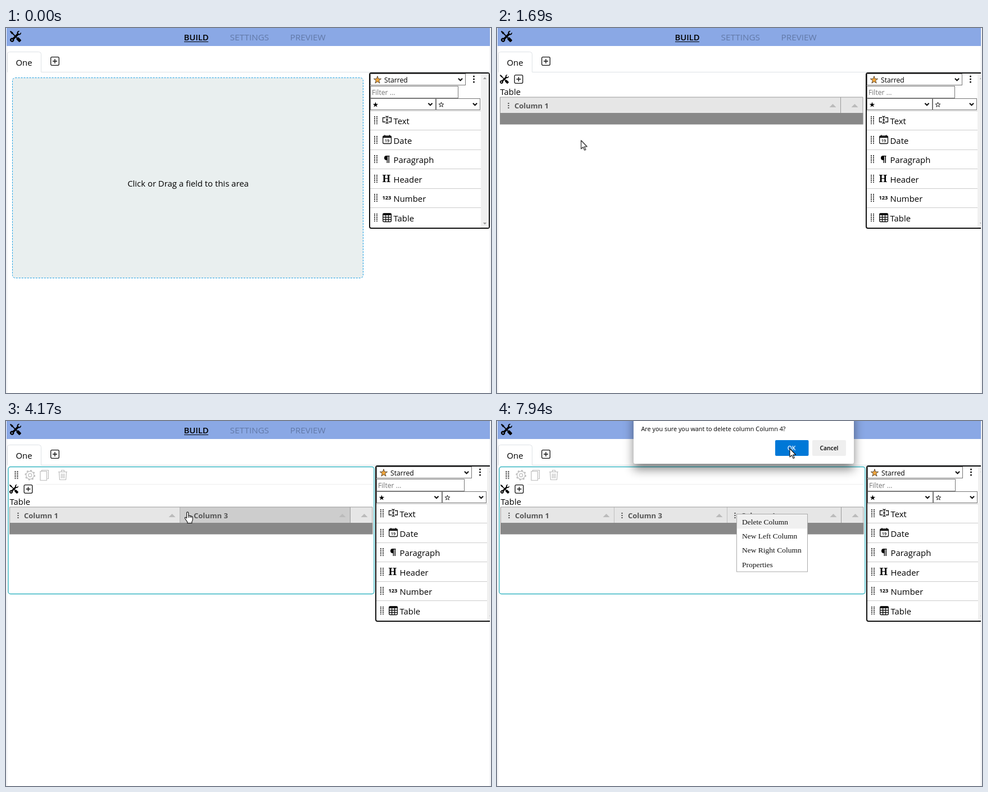
Recreate the animation shown at these times as an HTML page. Size 863x649 px, loop 8000 ms.

```html
<!DOCTYPE html>
<html lang="en">
<head>
<meta charset="utf-8">
<title>Form builder</title>
<style>
html, body { margin: 0; width: 100%; height: 100%; overflow: hidden; background: #fff; }
svg { display: block; width: 863px; height: 649px; }
text { font: 14.9px "Open Sans", "Noto Sans", sans-serif; fill: #000; }
.nav { font-size: 15.3px; fill: #6279a8; }
.nav.on { font-size: 14.8px; font-weight: 600; fill: #000; }
.small { font-size: 12.2px; }
.hint { fill: #757575; }
.col { font-size: 13px; font-weight: 700; fill: #555; }
.menu text { font: 13.5px "Liberation Serif", serif; fill: #111; }
.ask { font-size: 10.85px; }
.btn { font-size: 10.3px; font-weight: 600; text-anchor: middle; }
.ok { fill: #fff; }
.line { fill: none; stroke: #111; }
.box { fill: #fff; stroke: #767676; }
.dim { fill: none; stroke: #bdbdbd; stroke-width: 1.2; }

/* 1% = 80 ms */
.t { animation: 8s step-end infinite; }
.empty { animation-name: empty; }
.field { animation-name: field; }
.frame { animation-name: frame; }
.panel { animation-name: panel; }
.lift { animation-name: lift; }
.rowhot { animation-name: rowhot; }
.cols1 { animation-name: cols1; }
.cols2 { animation-name: cols2; }
.cols3 { animation-name: cols3; }
.hot1 { animation-name: hot1; }
.hot2 { animation-name: hot2; }
.hot3 { animation-name: hot3; }
.menu1 { animation-name: menu1; }
.menu2 { animation-name: menu2; }
.menu3 { animation-name: menu3; }
.pick1 { animation-name: pick1; }
.pick2 { animation-name: pick2; }
.dialog { animation-name: dialog; }
.arrow { animation-name: arrow; }
.hand { animation-name: hand; }
.click { animation-name: click; }
.cursor { animation: move 8s linear infinite, show 8s step-end infinite; }

@keyframes empty { 0% { opacity: 1 } 11.625%, 100% { opacity: 0 } }
@keyframes field { 0% { opacity: 0 } 11.625%, 100% { opacity: 1 } }
@keyframes frame { 0% { opacity: 0 } 22%, 100% { opacity: 1 } }
@keyframes panel {
  0% { transform: translateX(0) }
  11.625% { transform: translateX(10px) }
  22%, 100% { transform: translateX(11px) }
}
@keyframes lift { 0% { transform: translate(-1px, -30px) } 22%, 100% { transform: none } }
@keyframes rowhot { 0% { opacity: 0 } 9.8% { opacity: 1 } 11.625%, 100% { opacity: 0 } }
@keyframes cols1 { 0% { opacity: 1 } 40.875%, 100% { opacity: 0 } }
@keyframes cols2 { 0% { opacity: 0 } 40.875% { opacity: 1 } 64.25%, 100% { opacity: 0 } }
@keyframes cols3 { 0% { opacity: 0 } 64.25%, 100% { opacity: 1 } }
@keyframes hot1 { 0% { fill: #e6e6e6 } 23.75% { fill: #cdcdcd } 32.25%, 100% { fill: #e6e6e6 } }
@keyframes hot2 { 0% { fill: #e6e6e6 } 46.1% { fill: #cdcdcd } 55.5%, 100% { fill: #e6e6e6 } }
@keyframes hot3 { 0% { fill: #e6e6e6 } 71.2% { fill: #cdcdcd } 78%, 100% { fill: #e6e6e6 } }
@keyframes menu1 { 0% { opacity: 0 } 32.25% { opacity: 1 } 40.875%, 100% { opacity: 0 } }
@keyframes menu2 { 0% { opacity: 0 } 55.5% { opacity: 1 } 64.25%, 100% { opacity: 0 } }
@keyframes menu3 { 0% { opacity: 0 } 78%, 100% { opacity: 1 } }
@keyframes pick1 {
  0% { transform: none }
  34.2% { transform: translateY(25.4px) }
  36.4%, 100% { transform: translateY(50.8px) }
}
@keyframes pick2 {
  0% { transform: none }
  58.2% { transform: translateY(25.4px) }
  59.8%, 100% { transform: translateY(50.8px) }
}
@keyframes dialog { 0% { opacity: 0 } 91.25%, 100% { opacity: 1 } }
@keyframes hand {
  0%, 40.875%, 64.25% { opacity: 0 }
  23.75%, 46.1%, 71.2% { opacity: 1 }
  91.25%, 100% { opacity: 0 }
}
@keyframes arrow {
  0%, 40.875%, 64.25% { opacity: 1 }
  23.75%, 46.1%, 71.2% { opacity: 0 }
  91.25%, 100% { opacity: 1 }
}
@keyframes click {
  10.75%, 30.375%, 40%, 54.625%, 63.375%, 77.125%, 89.625% { opacity: .75 }
  0%, 11.625%, 32.25%, 40.875%, 55.5%, 64.25%, 78%, 90.375%, 100% { opacity: 0 }
}
@keyframes show { 0% { opacity: 0 } .875%, 100% { opacity: 1 } }
@keyframes move {
  0%, .875% { transform: translate(712px, 624px); animation-timing-function: ease-in-out }
  10.75%, 11.625% { transform: translate(706px, 336px) }
  15%, 15.9% { transform: translate(370px, 270px) }
  21.125% { transform: translate(150px, 200px) }
  22% { transform: translate(125px, 190px) }
  27.875%, 32.25% { transform: translate(24px, 166px) }
  37.5%, 40.875% { transform: translate(60px, 228px) }
  47%, 48.6% { transform: translate(348px, 172px) }
  52.125%, 56.5% { transform: translate(323px, 162px) }
  60%, 64.25% { transform: translate(350px, 216px) }
  67.625%, 68.5% { transform: translate(480px, 218px) }
  72.875%, 73.7% { transform: translate(436px, 170px) }
  74.6%, 78% { transform: translate(427px, 165px) }
  85.5%, 91.25% { transform: translate(447px, 180px) }
  99.25%, 100% { transform: translate(521px, 49px) }
}
</style>
</head>
<body>
<svg viewBox="0 0 863 649">
  <defs>
    <clipPath id="page"><path d="M0 0H861V649H0z"/></clipPath>
    <filter id="shade" x="-10%" y="-40%" width="120%" height="190%">
      <feDropShadow dx="0" dy="10" stdDeviation="9" flood-opacity=".48"/>
    </filter>
    <path id="star" d="M0-1 .235-.324 .951-.309 .38.124 .588.809 0 .4-.588.809-.38.124-.951-.309-.235-.324z"/>
    <path id="chev" d="M-3.6-1.8 0 1.8 3.6-1.8" fill="none" stroke="#111" stroke-width="2"/>
    <path id="sort" d="M-6 3H6L0-3z" fill="#bbb"/>
    <g id="grip" stroke="#222" stroke-width="2" stroke-dasharray="1.7 1.4"><path d="M0 0V14.2M4 0V14.2"/></g>
    <g id="plus" class="line"><rect x=".7" y=".7" width="14.6" height="14.6" rx="2" stroke-width="1.3"/><path d="M8 4V12M4 8H12" stroke-width="1.4"/></g>
    <path id="tools" d="M1 0 0 1l2.2 3.1q.3.4.8.4h.1q.4 0 .7.3l2.7 2.7-2.6 2.6A3 3 0 1 0 5.9 12.1l2.6-2.6 1 1-.3.9q-.2.6.2 1l3.3 3.3q.7.6 1.4 0l1.6-1.6q.6-.7 0-1.4l-3.3-3.3q-.4-.4-1-.2l-.9.3-1-1 2.7-2.6A3 3 0 0 0 15.9 2.2L13.8 4.4 12 4l-.4-1.8L13.8.1A3 3 0 0 0 10.1 3.8L7.5 6.5 4.8 3.8q-.3-.3-.3-.8 0-.5-.4-.8zM3 12l1 .6v1L3 14.2 2 13.6v-1z"/>
  </defs>

  <path d="M1 0H861V32H1z" fill="#8aa8e5"/>
  <use href="#tools" transform="translate(7 5) scale(1.25)"/>
  <text class="nav on" x="316.5" y="22">BUILD</text>
  <path d="M317 24.5H360" stroke="#000"/>
  <text class="nav" x="398.5" y="22">SETTINGS</text>
  <text class="nav" x="505.5" y="22">PREVIEW</text>
  <path d="M1.5 78.5H2.5V46.5Q2.5 42.5 6.5 42.5H58.5Q62.5 42.5 62.5 46.5V78.5H861" fill="none" stroke="#dee2e6"/>
  <text x="17.5" y="66.5">One</text>
  <use href="#plus" x="79" y="51"/>

  <g class="t empty">
    <rect x="11.5" y="88.5" width="624" height="356" rx="5" fill="#e9efef" stroke="#1b9fe3" stroke-dasharray="3 2"/>
    <text x="324" y="282" text-anchor="middle">Click or Drag a field to this area</text>
  </g>

  <g class="t field">
    <g class="t frame">
      <rect x="4" y="81.5" width="651" height="226" rx="4" fill="none" stroke="#35b5c1" stroke-width="1.4"/>
      <use href="#grip" x="16.5" y="89"/>
      <g class="dim">
        <circle cx="42.8" cy="96.3" r="7"/><circle cx="42.8" cy="96.3" r="3"/>
        <circle cx="42.8" cy="96.3" r="8.3" stroke-width="2" stroke-dasharray="3 3.52"/>
        <path d="M63.5 89.5V87.5H75.5V102.5H73.5M61 89.5H72.5V105.5H61z"/>
        <path d="M93 90.5H109M98.5 90V87.5H103.5V90M94.5 91 95.5 104.5H106.5L107.5 91M98.5 93.5V102M101 93.5V102M103.5 93.5V102"/>
      </g>
      <path d="M54 112.5H652" stroke="#eee"/>
    </g>
    <g class="t lift">
      <use href="#tools" x="6" y="113"/>
      <use href="#plus" x="31.5" y="113"/>
      <text x="6.5" y="148.5">Table</text>
      <g id="grid"></g>
    </g>
  </g>

  <g clip-path="url(#page)"><g class="t panel">
    <rect x="647" y="80" width="213" height="276" rx="3" fill="#fff" stroke="#111" stroke-width="2"/>
    <path d="M845 81H859V355H845z" fill="#f0f0f0"/>
    <path d="M849 91H855L852 87.5zM849 346H855L852 349.5z" fill="#999"/>
    <rect class="box" x="648.5" y="81.5" width="169" height="20"/>
    <use href="#star" transform="translate(661 92.5) scale(7)" fill="#f2a63b" stroke="#4a3b2a" stroke-width=".13"/>
    <text class="small" x="673" y="97">Starred</text>
    <use href="#chev" x="808.5" y="91.5"/>
    <path d="M832.5 86v.01M832.5 91v.01M832.5 96v.01" stroke="#111" stroke-width="3" stroke-linecap="round"/>
    <rect class="box" x="648.5" y="103.5" width="156" height="21"/>
    <text class="small hint" x="651" y="119">Filter ...</text>
    <rect class="box" x="648.5" y="125.5" width="116" height="20"/>
    <rect class="box" x="765.5" y="125.5" width="78" height="20"/>
    <use href="#star" transform="translate(657.5 136.5) scale(5)"/>
    <use href="#star" transform="translate(774.5 136.5) scale(4.6)" fill="none" stroke="#111" stroke-width=".2"/>
    <use href="#chev" x="755" y="135.5"/><use href="#chev" x="834.5" y="135.5"/>
    <path class="t rowhot" d="M648 321H845V355H648z" fill="#ececec"/>
    <path d="M648 147.5H845" stroke="#ccc"/>
    <g id="rows"></g>
    <g class="line" stroke-width="1.3">
      <path d="M675.5 167H670.5V159.5H675.5M680.5 159.5H685.5V167H680.5M675.5 157Q678 157 678 159V167.5Q678 169.5 675.5 169.5M680.5 157Q678 157 678 159M678 167.5Q678 169.5 680.5 169.5M676 163.3H680"/>
      <rect x="670.7" y="192" width="14.8" height="13.5" rx="2"/><path d="M671 194H685.5" stroke-width="2.5"/><path d="M674 190V193M682.5 190V193"/>
      <rect x="670.7" y="329.7" width="14.8" height="14.8" rx="2"/><path d="M671 331.5H685.5" stroke-width="3"/>
      <path d="M671 336.5H685.5M671 340.5H685.5M675.6 331V344.5M680.5 331V344.5"/>
    </g>
    <text x="678" y="203" text-anchor="middle" style="font-size:7.5px;font-weight:600">19</text>
    <path d="M682.5 227H677a4 4 0 0 0 0 8h.6V240H679V228.3H680.5V240H682V228.3H682.5z"/>
    <text x="669.5" y="274" style="font:700 18px 'Noto Serif',serif">H</text>
    <text x="669.5" y="305" style="font-size:9.3px;font-weight:700">123</text>
  </g></g>
  <path d="M1.5 32V649M861.5 0V649" stroke="#e2e4e8"/>

  <g id="menus"></g>

  <g class="t dialog">
    <path d="M243-20H635V72Q635 76 631 76H247Q243 76 243 72z" fill="#fff" filter="url(#shade)"/>
    <text class="ask" x="256.5" y="17.5">Are you sure you want to delete column Column 4?</text>
    <rect x="495" y="34" width="59.5" height="28" rx="2" fill="#0078d7"/>
    <text class="btn ok" x="524" y="52">OK</text>
    <rect x="561" y="34" width="60" height="28" rx="2" fill="#efefef"/>
    <text class="btn" x="591" y="52">Cancel</text>
  </g>

  <g class="cursor">
    <circle class="t click" r="10.5" fill="#f0e800"/>
    <g fill="#fff" stroke="#111" stroke-width="1.1" stroke-linejoin="round">
      <path class="t arrow" d="M0 0V15L3.5 11.8 6 17.4 8.2 16.4 5.8 11H10.5z"/>
      <path class="t hand" d="M-1.5 10V1.5a1.6 1.6 0 0 1 3.2 0V6.5q1.5-1.2 2.8.4 1.6-.8 2.6.6 2-.3 2 1.8v4q0 2-1.4 4v2.2h-8v-2.2q-1.5-1.6-4.2-6-.8-1.8.8-2 1 0 2.2 1.7zM1.7 6.5V10M4.5 7V10M7.1 7.6V10"/>
    </g>
  </g>
</svg>
<script>
const fill = (id, html) => { document.getElementById(id).innerHTML = html; };

const sort = x => `<use href="#sort" x="${x}" y="168"/>`;

// Whole-pixel columns; the last one takes the remainder.
function header(names) {
  const left = 7.5, right = 612.5, n = names.length;
  const w = Math.floor((right - left) / n);
  const cells = names.map((name, i) => {
    const last = i === n - 1;
    const x = left + w * i, end = last ? right : x + w;
    return `<rect ${last ? `class="t hot${n}"` : ''} x="${x}" y="153" width="${end - x}" height="28" fill="#e6e6e6"/>
      <path d="M${x + 14} 163v2m0 2v2m0 2v2" stroke="#444" stroke-width="2"/>
      <text class="col" x="${x + 24.5}" y="172.5">Column ${name}</text>
      <path d="M${end} 153v28" stroke="#999"/>${sort(end - 14)}`;
  });
  return `<g class="t cols${n}">${cells.join('')}</g>`;
}

fill('grid', `<path d="M6.5 153H652V181H6.5z" fill="#e6e6e6"/>
  ${header([1])}${header([1, 3])}${header([1, 3, 4])}${sort(637.5)}
  <path d="M6 181H652.5V201.5H6z" fill="#888"/>
  <path d="M6.5 201V153H652V201" fill="none" stroke="#999"/>`);

fill('rows', ['Text', 'Date', 'Paragraph', 'Header', 'Number', 'Table'].map((name, i) => {
  const y = Math.round(34.6 * i);
  const rule = i < 5 ? `<path d="M648 ${y + 181.5}H845" stroke="#ccc"/>` : '';
  return `<use href="#grip" x="656" y="${y + 157}"/><text x="689.5" y="${y + 171}">${name}</text>${rule}`;
}).join(''));

const items = ['Delete Column', 'New Left Column', 'New Right Column', 'Properties'];
const menu = (n, x, y) => `<g transform="translate(${x} ${y})"><g class="menu t menu${n}">
  <rect x=".5" y=".5" width="126" height="102.5" fill="#fff" stroke="#aaa"/>
  <rect class="t pick${n}" x="1" y="1" width="125" height="25.4" fill="#f0f0f0"/>
  ${items.map((s, i) => `<text x="10" y="${18.5 + 25.4 * i}">${s}</text>`).join('')}</g></g>`;
fill('menus', menu(1, 24, 165) + menu(2, 321, 163) + menu(3, 426, 165));
</script>
</body>
</html>
```
